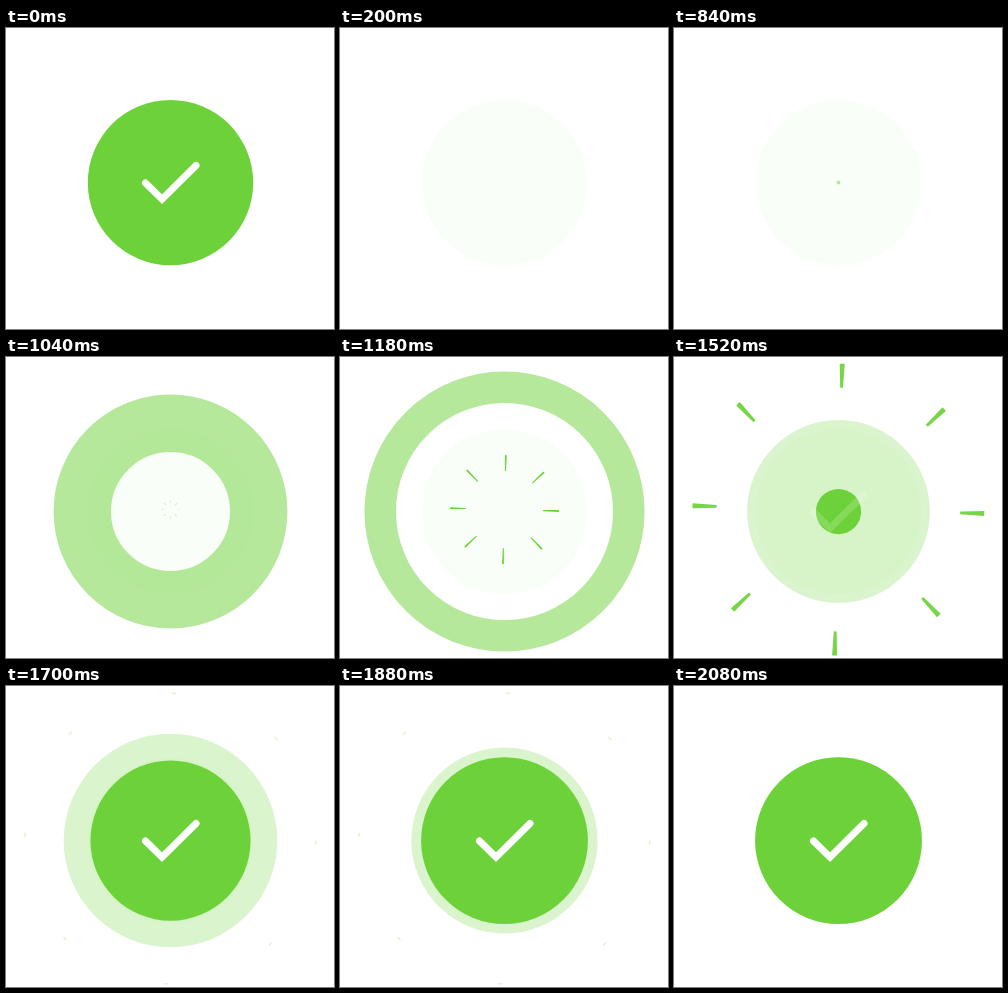
Animation, 328 px wide and 301 px high, one loop 3.6 s. Source, as an HTML page:

```html
<!DOCTYPE html>
<html lang="en">
<head>
<meta charset="utf-8">
<title>Success check</title>
<style>
  html, body { margin: 0; width: 100%; height: 100%; overflow: hidden; background: #fff; }
  svg { display: block; width: 100vw; height: 100vh; }
</style>
</head>
<body>
<svg viewBox="0 0 328 301">
  <circle cx="164.5" cy="154.5" r="82.7" fill="#f9fff8"/>
  <circle id="halo" cx="164.5" cy="154.5" fill="#6dd239" opacity=".25"/>
  <circle id="ring" cx="164.5" cy="154.5" fill="none" stroke="#6dd239" opacity=".5"/>
  <path id="rays" fill="#6dd239"/>
  <g id="badge">
    <circle id="disc" cx="164.5" cy="154.6" fill="#6dd239"/>
    <path id="tick" d="M139.5 155 156 171.2 190 137.5" fill="none" stroke="#fff"
      stroke-width="7" stroke-linecap="round"/>
  </g>
</svg>
<script>
const LOOP = 3600, STEP = 20;
const FULL = 83.4;

const $ = id => document.getElementById(id);
const [halo, ring, rays, badge, disc, tick] =
  ['halo', 'ring', 'rays', 'badge', 'disc', 'tick'].map($);

const set = (el, attrs) => {
  for (const k in attrs) el.setAttribute(k, attrs[k]);
};
const span = (t, a, b) => Math.min(1, Math.max(0, (t - a) / (b - a)));
const mix = (a, b, p) => a + (b - a) * p;
const quartOut = x => 1 - (1 - x) ** 4;
const sineOut = x => Math.sin(x * Math.PI / 2);
const sineInOut = x => (1 - Math.cos(x * Math.PI)) / 2;
const cubicInOut = x => x < .5 ? 4 * x ** 3 : 1 - 4 * (1 - x) ** 3;

// Eight tapered spokes, wider at the outer end
function spokes(inner, outer, wIn, wOut) {
  let d = '';
  for (let i = 0; i < 8; i++) {
    const a = (i * 45 + 1.5) * Math.PI / 180;
    const c = Math.cos(a), s = Math.sin(a);
    const pt = (r, w) =>
      (164.4 + r * c - w * s).toFixed(2) + ' ' + (152.6 + r * s + w * c).toFixed(2);
    d += `M${pt(inner, -wIn / 2)}L${pt(outer, -wOut / 2)} ` +
         `${pt(outer, wOut / 2)} ${pt(inner, wIn / 2)}Z`;
  }
  return d;
}

function drawRing(t) {
  const outer = 145 * quartOut(span(t, 838, 1438));
  const inner = 145 * sineOut(span(t, 900, 1420));
  const width = Math.max(0, outer - inner);
  set(ring, { r: (outer + inner) / 2, 'stroke-width': width });
}

function drawRays(t) {
  const s = cubicInOut(span(t, 867, 1557));
  const outer = 146 * s;
  const trim = mix(.707, .99, span(t, 1380, 1690));
  const fade = mix(1, .25, span(t, 1500, 1700)) * (1 - span(t, 1880, 2060));
  set(rays, { d: spokes(outer * trim, outer, 2.8 * s, 5 * s), opacity: fade });
}

function drawHalo(t) {
  const grow = 109.5 * sineInOut(span(t, 1300, 1600));
  const shrink = sineInOut(span(t, 1600, 2080));
  set(halo, { r: t < 1600 ? grow : mix(109.5, FULL, shrink) });
}

function drawBadge(t) {
  if (t <= 200) {
    set(disc, { r: 82.7 });
    set(tick, { opacity: 1 });
    set(badge, { opacity: 1 - t / 200 });
    return;
  }
  set(disc, { r: FULL * sineInOut(span(t, 1400, 1744)) });
  set(tick, { opacity: span(t, 1500, 1620) });
  set(badge, { opacity: t < 1400 ? 0 : 1 });
}

function render(ms) {
  const t = Math.floor(ms % LOOP / STEP) * STEP;
  drawRing(t);
  drawRays(t);
  drawHalo(t);
  drawBadge(t);
}

const start = performance.now();
function tickFrame(now) {
  render(Math.max(0, now - start));
  requestAnimationFrame(tickFrame);
}
render(0);
requestAnimationFrame(tickFrame);
</script>
</body>
</html>
```
